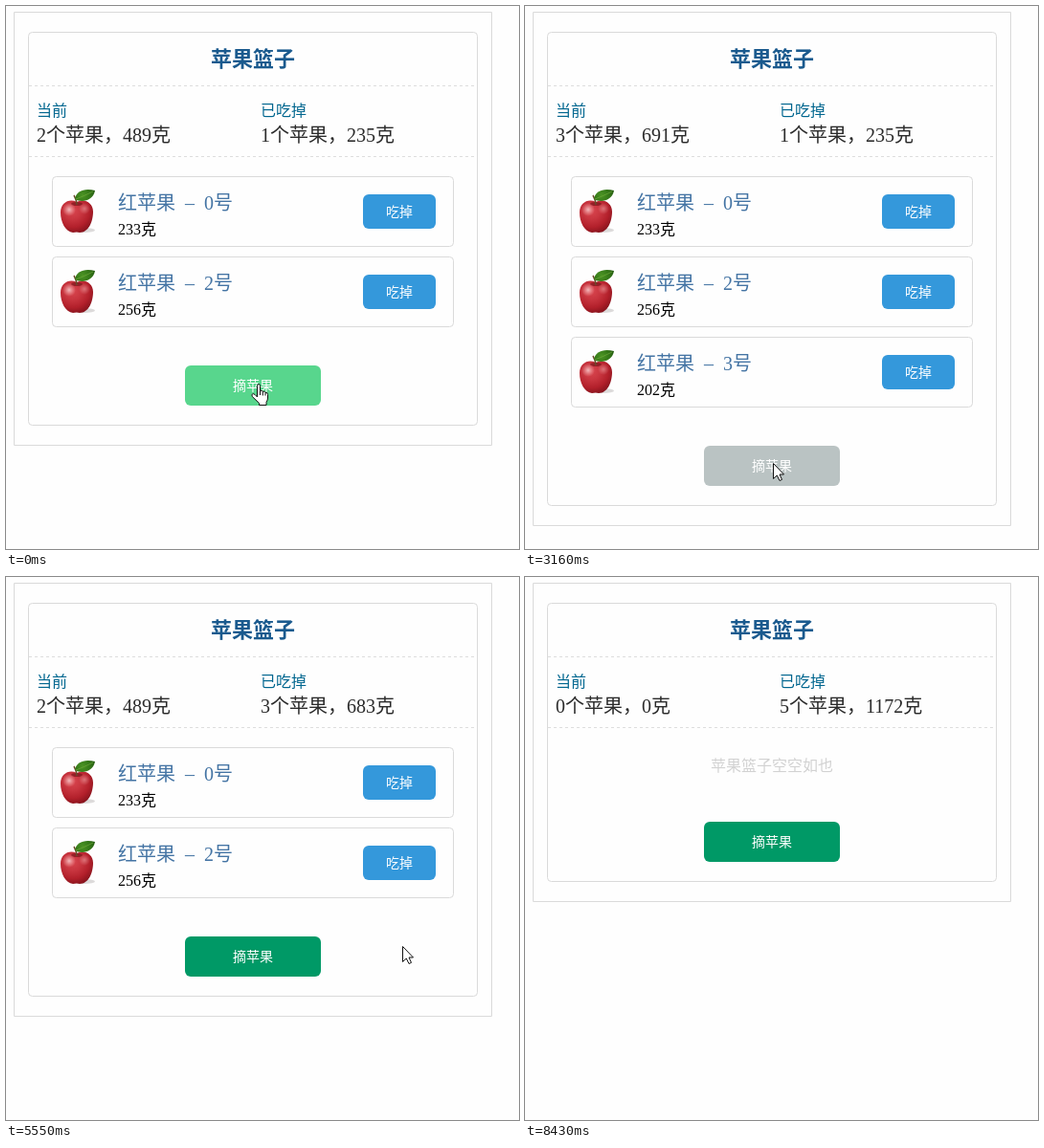
Recreate the animation shown at these times as an HTML page with a canvas. Size 536x568 px, loop 9020 ms.

```html
<!DOCTYPE html>
<html lang="zh-CN">
<head>
<meta charset="utf-8">
<title>苹果篮子</title>
<style>
html, body { margin: 0; width: 100%; height: 100%; overflow: hidden; background: #fefefe; }
canvas { display: block; }
</style>
</head>
<body>
<canvas id="stage" width="536" height="568"></canvas>
<script>
const ctx = document.getElementById('stage').getContext('2d');
const LOOP = 9020;
const TICK = 135; // the pointer moves in visible steps of about this long
const PITCH = 84;
const FAMILY = '"Liberation Serif", "Noto Sans CJK SC", "Noto Sans CJK", sans-serif';
const GRAMS = [233, 235, 256, 202, 246];

const picks = [{ click: 1250, done: 2620, id: 3 }, { click: 3160, done: 3560, id: 4 }];
const meals = [{ done: 0, id: 1 }, { done: 4540, id: 4 }, { done: 5420, id: 3 },
  { done: 6500, id: 2 }, { done: 7490, id: 0 }];

// each stroke eases the pointer from where it was to (x, y)
const HOME = { x: 262, y: 395 };
const GONE = 8430;
const strokes = [
  { from: 1250, to: 2180, x: 266, y: 432 },
  { from: 2760, to: 3010, x: 259, y: 478 },
  { from: 3560, to: 3840, x: 314, y: 486 },
  { from: 3840, to: 4270, x: 424, y: 466 },
  { from: 4540, to: 4960, x: 415, y: 395 },
  { from: 4960, to: 5550, x: 414, y: 386 },
  { from: 5550, to: 5940, x: 405, y: 287 },
  { from: 6500, to: 6930, x: 408, y: 223 },
  { from: 7790, to: 8050, x: 411, y: 357 },
  { from: 8050, to: 8310, x: 326, y: 430 }
];

const arrowShape = new Path2D('M.5 .5V16.5L4.3 13L7 18.5L9.5 17.4L7 12H11.5Z');
const handShape = new Path2D('M6.5 14V2.5Q6.5 .5 8 .5T9.5 2.5V7.5Q11.5 6.5 12.3 8.3Q14.2 7.5 15 9.3' +
  'Q17.5 9 17.5 11.5V15Q17.5 17 16 19.5V22.5H8.5V20.5L1.3 13.5Q0 11 2.2 10.6Q3.8 10.6 6.5 14Z');
const handLines = new Path2D('M9.5 7.5V12M12.3 8.3V12.5M15 9.3V12.5');
const leafShape = new Path2D('M72 202C73 193 83 190 93 193C91 204 79 206 72 202Z');
const bodyShape = new Path2D('M74 205C82 201 91 206 91 215C91 226 86 237 77 237' +
  'Q74 236 70 237C62 236 57 226 57 216C57 206 66 201 74 205Z');

function pointerAt(t) {
  let p = HOME;
  for (const s of strokes) {
    if (t < s.from) break;
    const steps = Math.round((s.to - s.from) / TICK);
    const k = Math.min(1, Math.floor((t - s.from + 15) / (s.to - s.from) * steps) / steps);
    const ease = k * (2 - k);
    p = { x: Math.round(p.x + (s.x - p.x) * ease), y: Math.round(p.y + (s.y - p.y) * ease) };
  }
  return p;
}

const inside = (p, x, y, w, h) => p.x >= x && p.x < x + w && p.y >= y && p.y < y + h;

function text(str, x, cy, size, color, weight = 300) {
  ctx.font = `${weight} ${size}px ${FAMILY}`;
  ctx.fillStyle = color;
  ctx.fillText(str, x, Math.round(cy + size * 0.37));
}

function frame(x, y, right, bottom, radius) {
  ctx.beginPath();
  ctx.roundRect(x + 0.5, y + 0.5, right - x - 1, bottom - y - 1, radius);
  ctx.lineWidth = 1;
  ctx.strokeStyle = '#dadada';
  ctx.stroke();
}

function button(x, y, w, h, color, label) {
  ctx.beginPath();
  ctx.roundRect(x, y, w, h, 6);
  ctx.fillStyle = color;
  ctx.fill();
  text(label, x + (w - label.length * 14) / 2, y + h / 2, 14, '#fff', 400);
}

function line(color, width, x0, y0, cx, cy, x1, y1) {
  ctx.beginPath();
  ctx.moveTo(x0, y0);
  ctx.quadraticCurveTo(cx, cy, x1, y1);
  ctx.strokeStyle = color;
  ctx.lineWidth = width;
  ctx.stroke();
}

function dashes(y) {
  ctx.setLineDash([3, 3]);
  line('#ddd', 1, 24, y + 0.5, 258, y + 0.5, 492, y + 0.5);
  ctx.setLineDash([]);
}

function radial(x, y, r, ...colors) {
  const g = ctx.createRadialGradient(x, y, 0, x, y, r);
  colors.forEach((c, i) => g.addColorStop(i / (colors.length - 1), c));
  return g;
}

function oval(color, x, y, rx, ry) {
  ctx.fillStyle = color;
  ctx.beginPath();
  ctx.ellipse(x, y, rx, ry, 0, 0, Math.PI * 2);
  ctx.fill();
}

function apple() {
  oval('rgba(120,110,110,.25)', 81, 234.5, 12, 2.5);
  ctx.fillStyle = radial(70, 214, 26, '#d8454e', '#c93640', '#b3202b', '#7c1019');
  ctx.fill(bodyShape);
  oval('rgba(110,15,22,.6)', 74, 207, 6, 2);
  oval(radial(66, 213, 7, 'rgba(255,225,225,.75)', 'rgba(255,190,190,0)'), 66, 213, 7, 7);
  oval(radial(82, 212, 6, 'rgba(255,200,200,.45)', 'rgba(255,190,190,0)'), 82, 212, 6, 6);
  line('#6b4a2a', 1.5, 74, 208, 74, 203, 71, 198);
  ctx.fillStyle = radial(80, 198, 14, '#4c9424', '#357a18', '#255a10');
  ctx.fill(leafShape);
  line('#6fa83c', 0.7, 73, 202, 81, 199, 91, 194);
}

function row(id, i, pointer) {
  const y = 178 + i * PITCH;
  const hover = inside(pointer, 373, y + 19, 76, 36);
  const blue = '#4474a4';
  frame(48, y, 468, y + 74, 4);
  ctx.save();
  ctx.translate(0, i * PITCH);
  apple();
  ctx.restore();
  text('红苹果', 117, y + 28, 20, blue);
  text('–', 187, y + 28, 20, blue);
  text(id + '号', 207, y + 28, 20, blue);
  text(GRAMS[id] + '克', 117, y + 55, 16, '#000');
  button(373, y + 19, 76, 36, hover ? '#5dade2' : '#3498db', '吃掉');
  return hover;
}

function cursor(p, hand) {
  const shape = hand ? handShape : arrowShape;
  ctx.save();
  ctx.translate(hand ? p.x - 6 : p.x, p.y);
  ctx.lineWidth = 1;
  ctx.fillStyle = '#fff';
  ctx.strokeStyle = '#111';
  ctx.fill(shape);
  ctx.stroke(shape);
  if (hand) ctx.stroke(handLines);
  ctx.restore();
}

function summary(label, ids, x) {
  const grams = ids.reduce((sum, id) => sum + GRAMS[id], 0);
  text(label, x, 109, 16, '#00668f');
  text(`${ids.length}个苹果，${grams}克`, x, 135, 20, '#2b2b2b');
}

function draw(t) {
  const doneIds = list => list.filter(e => t >= e.done).map(e => e.id);
  const eaten = doneIds(meals);
  const left = [0, 1, 2, ...doneIds(picks)].filter(id => !eaten.includes(id));
  const busy = picks.some(p => t >= p.click && t < p.done);
  const pointer = pointerAt(t);
  const top = left.length ? 208 + left.length * PITCH : 256;

  ctx.fillStyle = '#fefefe';
  ctx.fillRect(0, 0, 536, 568);
  frame(8, 6, 508, top + 84, 0);
  frame(23, 27, 493, top + 63, 4);
  text('苹果篮子', 214, 55, 22, '#1a5a8e', 700);
  dashes(83);
  dashes(157);
  summary('当前', left, 32);
  summary('已吃掉', eaten, 266);

  const hovers = left.map((id, i) => row(id, i, pointer));
  if (!left.length) text('苹果篮子空空如也', 194, 197, 16, '#d2d2d2');

  const ready = !busy && inside(pointer, 187, top, 142, 42);
  button(187, top, 142, 42, busy ? '#bac3c3' : ready ? '#58d68d' : '#009966', '摘苹果');
  if (t < GONE) cursor(pointer, ready || hovers.includes(true));
}

function tick() {
  draw(performance.now() % LOOP);
  requestAnimationFrame(tick);
}
tick();
</script>
</body>
</html>
```
